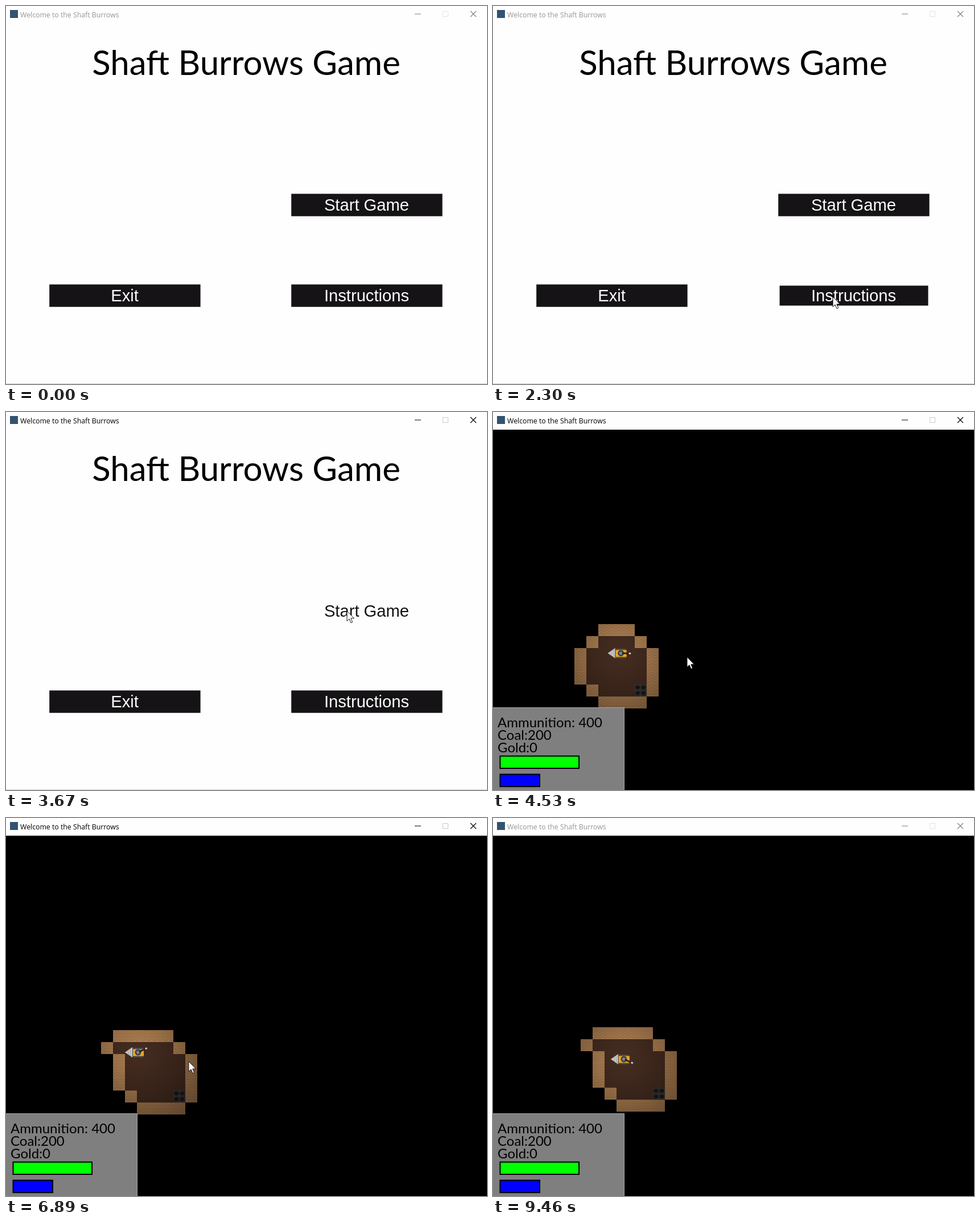
Animation of 845x663 px, one loop 9510 ms. Source, as an HTML page:

```html
<!DOCTYPE html>
<html lang="en">
<head>
<meta charset="utf-8">
<title>Welcome to the Shaft Burrows</title>
<style>
  html, body { margin: 0; width: 100%; height: 100%; overflow: hidden; background: #fefefe; }
  svg { display: block; width: 845px; height: 663px; }
  .bar { font: 12.3px "Open Sans", "Noto Sans", sans-serif; }
  .heading { font: 60px Lato, sans-serif; text-anchor: middle; }
  .button { font: 29.2px "Liberation Sans", Arial, sans-serif; text-anchor: middle; }
  .hud { font: 24px Lato, sans-serif; }
</style>
</head>
<body>
<svg viewBox="0 0 845 663">
  <defs>
    <pattern id="wall" width="20" height="21" patternUnits="userSpaceOnUse" x="188" y="371">
      <rect width="20" height="21" fill="#b18254"/>
      <g id="grain" fill="none" stroke="#966b42" stroke-opacity=".55" stroke-width="1.4"></g>
    </pattern>
    <radialGradient id="light" gradientUnits="userSpaceOnUse" cx="0" cy="0" r="150">
      <stop offset="0" stop-opacity="0"/>
      <stop offset=".3" stop-opacity=".12"/>
      <stop offset="1" stop-opacity=".5"/>
    </radialGradient>
  </defs>

  <rect width="845" height="663" fill="#fefefe"/>

  <g id="menu">
    <text class="heading" x="422" y="121">Shaft Burrows Game</text>
    <path d="M0 662.5H845" stroke="#cfcfcf"/>
  </g>

  <g id="game">
    <rect y="31" width="845" height="632"/>
    <g id="world">
      <g id="cave" shape-rendering="crispEdges"></g>
      <g id="coal" transform="translate(294 477.5)"></g>
      <circle id="shade" r="200" fill="url(#light)"/>
      <g id="ship">
        <g id="hull">
          <path d="M-23 0L-10 -9V9Z" fill="#c6c6c6"/>
          <path d="M-18 -3L-16 4M-14 -6L-12 7" stroke="#a2a2a2"/>
          <rect x="-10" y="-8" width="19" height="17" fill="#47484a"/>
          <rect x="-9" y="-5.5" width="19" height="12" fill="#f0a71f"/>
        </g>
        <circle r="5.5" fill="#3c4148"/>
        <circle r="2.8" fill="#7d8790"/>
        <g id="gun">
          <path d="M2 0H14" stroke="#25272a" stroke-width="3"/>
          <path d="M14 0H17.5" stroke="#c9cac6" stroke-width="3"/>
        </g>
      </g>
    </g>
    <rect y="518" width="231" height="145" fill="#7f7f7f"/>
    <path d="M0 518.5H230.5V663" fill="none" stroke="#a4a4a4"/>
    <g class="hud">
      <text x="8" y="553">Ammunition: 400</text>
      <text x="8" y="575">Coal:200</text>
      <text x="8" y="597">Gold:0</text>
    </g>
    <g stroke="#000" stroke-width="2">
      <rect x="12.5" y="603.5" width="138.5" height="21.5" fill="#0f0"/>
      <rect x="12.5" y="635.5" width="69.5" height="21.5" fill="#00f"/>
    </g>
  </g>

  <rect x="7" y="7" width="14" height="14" fill="#33536f"/>
  <text id="caption" class="bar" x="25" y="20">Welcome to the Shaft Burrows</text>
  <path id="controls" d="M718 14H729M816 9L826 19M826 9L816 19" fill="none" stroke-width="1.2"/>
  <rect id="maximise" x="767.5" y="9.5" width="9" height="9" fill="none"/>

  <path id="cursor" d="M0 0V17.6L4.1 13.9L7 20.7L9.7 19.6L6.9 12.9H12.5Z" fill="#fff" stroke="#000" stroke-width=".9"/>
</svg>

<script>
const LOOP = 9510, CLICK = 3670, PLAY = 4020, BLUR = 9460;
const TILE = 21.2;
const $ = id => document.getElementById(id);

function add(parent, name, attrs, text = '') {
  const node = document.createElementNS('http://www.w3.org/2000/svg', name);
  for (const key in attrs) node.setAttribute(key, attrs[key]);
  node.textContent = text;
  return parent.appendChild(node);
}

// Each stop: time of leaving the previous one, time of arrival, x, y
const pointer = [
  [0, 320, 455, 650], [320, 1260, 250, 506], [1310, 2270, 597, 510],
  [2300, 3300, 599, 349], [PLAY, 4590, 333, 430], [5020, 5640, 222, 396],
  [5870, 6770, 312, 373], [6800, 6890, 321, 427], [6890, 7750, 331, 414],
  [7980, 9040, 766, 663]
];
const drive = [
  [0, PLAY, 270, 423], [5640, 5840, 263, 416], [5870, 6770, 232, 411],
  [7000, 7500, 253, 432], [7500, 7750, 249, 428.5], [8200, 8600, 243, 427.5]
];

function ease(t, from, to) {
  const u = Math.min(1, Math.max(0, (t - from) / (to - from)));
  return u * u * (3 - 2 * u);
}

// Sideways moves sag in proportion to their length
function travel(stops, t, sag = 0) {
  const i = Math.max(0, stops.findLastIndex(s => s[0] <= t));
  const [leave, arrive, x1, y1] = stops[i];
  const [, , x0, y0] = stops[Math.max(0, i - 1)];
  const k = ease(t, leave, arrive), dx = x1 - x0, dy = y1 - y0;
  return {
    x: x0 + dx * k,
    y: y0 + dy * k + sag * Math.abs(dx) * Math.sin(Math.PI * k),
    angle: i ? Math.atan2(dy, dx) * 180 / Math.PI : 180
  };
}
const pointerAt = t => travel(pointer, t, .09);

for (let y = 3; y < 21; y += 5) add($('grain'), 'path', { d: `M0 ${y}q2.5 3 5 0t5 0 5 0 5 0` });

add($('coal'), 'rect', { width: TILE, height: TILE, fill: '#3d3735' });
for (let i = 0; i < 4; i++) {
  add($('coal'), 'ellipse', {
    cx: 5.5 + i % 2 * 10, cy: 5.5 + (i >> 1) * 10, rx: 4, ry: 3.4,
    fill: '#1a1919', stroke: '#2a2727'
  });
}

// A square room with three blocked corners; the ship drills two cells to its left
function isFloor(c, r, t) {
  if (r === 1 && c === 1) return t > 6050;
  if (r === 1 && c === 0) return t > 6380;
  const inside = c >= 1 && c <= 5 && r >= 1 && r <= 5;
  return inside && !(r === 1 && c === 5) && !(r === 5 && c === 1);
}

function fillOf(c, r, t) {
  if (isFloor(c, r, t)) return '#452c20';
  const beside = isFloor(c - 1, r, t) || isFloor(c + 1, r, t) || isFloor(c, r - 1, t) || isFloor(c, r + 1, t);
  return beside ? 'url(#wall)' : 'none';
}

const cells = [];
for (let r = 0; r <= 6; r++) {
  for (let c = -1; c <= 6; c++) {
    const node = add($('cave'), 'rect', {
      x: 188 + c * TILE, y: 371.5 + r * TILE, width: TILE, height: TILE
    });
    cells.push({ c, r, node });
  }
}

const buttons = [['Start Game', 501, 329], ['Exit', 76, 488], ['Instructions', 501, 488]]
  .map(([label, x, y]) => ({
    x, y,
    box: add($('menu'), 'rect', { x: x + .2, y: y + .4, width: 265.4, height: 39.3 }),
    rim: add($('menu'), 'rect', {
      x: x + 1, y: y + 1, width: 264, height: 38, fill: 'none', stroke: '#fefefe', 'stroke-width': 3
    }),
    text: add($('menu'), 'text', { class: 'button', x: x + 132.5, y: y + 30 }, label)
  }));

const show = (node, on) => node.setAttribute('display', on ? 'inline' : 'none');
const place = (node, { x, y }) => node.setAttribute('transform', `translate(${x} ${y})`);
const turn = (node, angle) => node.setAttribute('transform', `rotate(${angle})`);

function drawMenu(t, mouse) {
  for (const b of buttons) {
    const over = mouse.x >= b.x && mouse.x <= b.x + 266 && mouse.y >= b.y && mouse.y <= b.y + 40;
    const pressed = over && t >= CLICK;
    b.box.setAttribute('fill', pressed ? '#fefefe' : '#151315');
    b.text.setAttribute('fill', pressed ? '#151315' : '#fefefe');
    show(b.rim, over);
  }
}

function drawGame(t) {
  const ship = travel(drive, t);
  // The view scrolls left with the ship, then slightly down
  const camera = { x: Math.min(0, 1.194 * (232 - ship.x)), y: -4.5 * ease(t, 7200, 7500) };
  place($('world'), camera);
  place($('ship'), ship);
  place($('shade'), ship);
  turn($('hull'), 180 + 45 * Math.round(ship.angle / 45));
  for (const { c, r, node } of cells) node.setAttribute('fill', fillOf(c, r, t));
  // The gun trails the pointer slightly
  const aim = pointerAt(t - 100);
  turn($('gun'), Math.atan2(aim.y - ship.y - camera.y, aim.x - ship.x - camera.x) * 180 / Math.PI);
}

function draw(t) {
  const mouse = pointerAt(t), playing = t >= PLAY;
  const active = t >= CLICK && t < BLUR;
  show($('menu'), !playing);
  show($('game'), playing);
  if (playing) drawGame(t); else drawMenu(t, mouse);
  $('caption').setAttribute('fill', active ? '#000' : '#969696');
  $('controls').setAttribute('stroke', active ? '#000' : '#808080');
  $('maximise').setAttribute('stroke', active ? '#cccccc' : '#e4e4e4');
  show($('cursor'), t >= 320 && t < 9040);
  place($('cursor'), mouse);
}

const start = performance.now();
function frame() {
  draw((performance.now() - start) % LOOP);
  requestAnimationFrame(frame);
}
frame();
</script>
</body>
</html>
```
